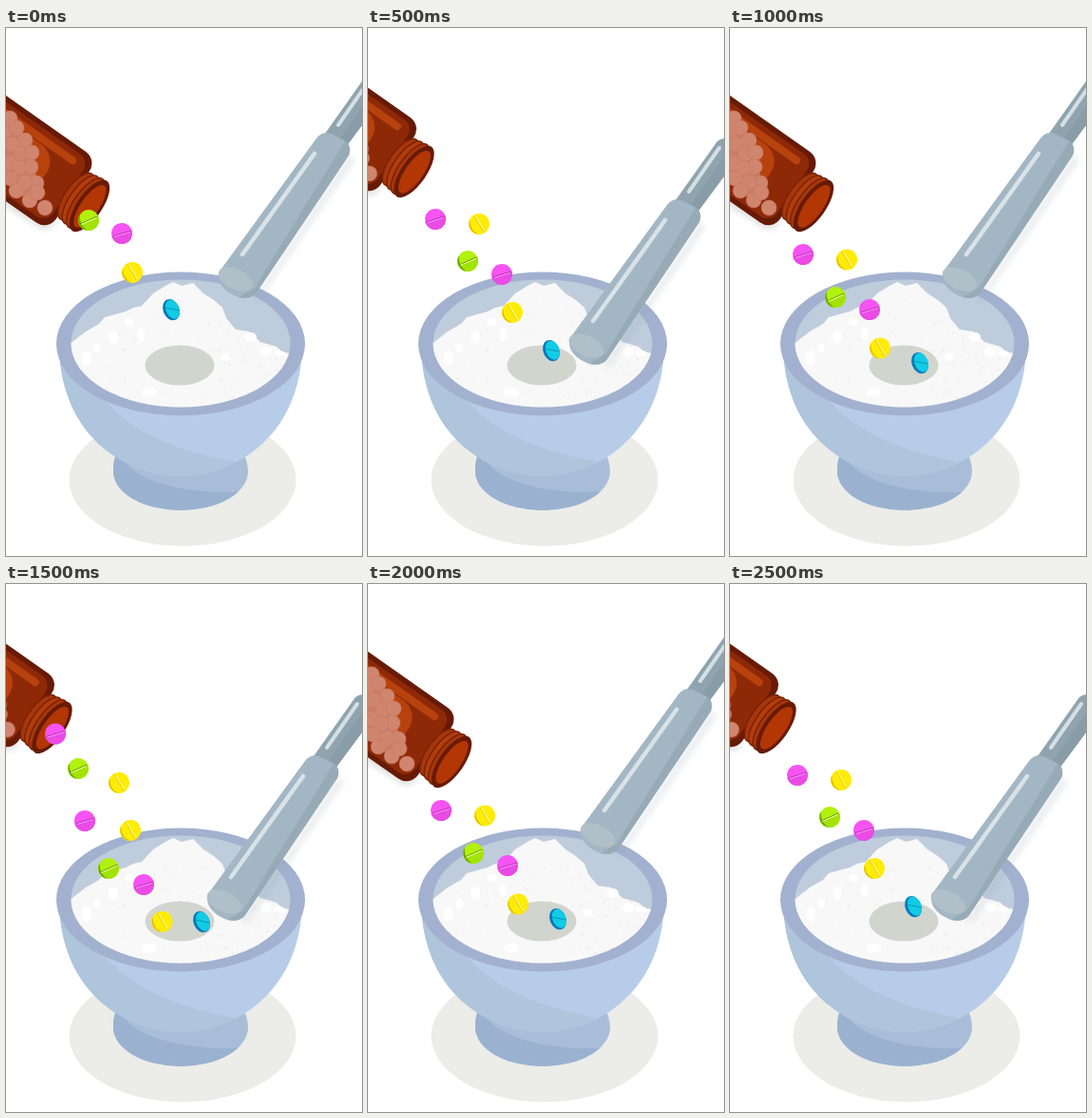
Write an HTML page that moves like this. It is 375 px wide and 555 px high and loops after 3 s.

```html
<!DOCTYPE html>
<html lang="en">
<head>
<meta charset="utf-8">
<title>Mortar and pestle</title>
<style>
  html, body { margin: 0; width: 100%; height: 100%; overflow: hidden; background: #fff; }
  svg { display: block; width: 375px; height: 555px; }
</style>
</head>
<body>
<svg viewBox="0 0 375 555">
  <defs>
    <clipPath id="inside"><ellipse cx="184" cy="331.5" rx="115.5" ry="67"/></clipPath>
    <clipPath id="bowl"><path d="M56 335C58 432 129 471 184 471S310 431 312 335Z"/></clipPath>
    <clipPath id="foot"><path d="M121 440C113 450 113 460 113 466A71 41 0 0 0 255 466Q255 455 247 440Z"/></clipPath>
    <filter id="soft" x="-30%" y="-30%" width="160%" height="160%"><feGaussianBlur stdDeviation="3"/></filter>
    <g id="magenta" transform="rotate(-17)">
      <circle r="11" fill="#f653f3"/>
      <path d="M-11 0A11 11 0 0 0 11 0Z" fill="#e94be4"/>
      <path d="M-10 0H10" stroke="#a92fa8" stroke-width=".8"/>
      <path d="M-9 1H9" stroke="#ff9dfb" stroke-width=".8"/>
    </g>
    <g id="yellow" transform="rotate(60)">
      <circle r="11" fill="#ffec05"/>
      <path d="M-9 6A11 11 0 0 0 9 6Q0 12-9 6Z" fill="#dfbd00"/>
      <path d="M-10 0H10" stroke="#e0c000" stroke-width=".8"/>
      <path d="M-9-1H9" stroke="#fff9a0"/>
    </g>
    <g id="green" transform="rotate(-24)">
      <circle r="11" fill="#b2f00e"/>
      <path d="M-11 0A11 11 0 0 0 11 0Z" fill="#a2e306"/>
      <path d="M-6-9A11 11 0 0 0-6 9Q-11 0-6-9Z" fill="#6fa900"/>
      <path d="M-10 0H10" stroke="#588600" stroke-width=".9"/>
      <path d="M-9 1H9" stroke="#e2ff98"/>
    </g>
    <g id="cyan" transform="rotate(-22)">
      <ellipse cx="-.5" rx="8.5" ry="11.5" fill="#0879b9"/>
      <ellipse cx="1" rx="7" ry="10.5" fill="#12cbe5"/>
      <path d="M-5-4L7 4" stroke="#078fb8" stroke-width=".8"/>
    </g>
  </defs>

  <ellipse cx="186" cy="475" rx="119.5" ry="69.5" fill="#ecece8"/>
  <g clip-path="url(#foot)">
    <path d="M100 430H270V520H100Z" fill="#a9bdd9"/>
    <path d="M100 430H118L122 452C135 475 185 492 256 487V520H100Z" fill="#9ab2d0"/>
  </g>
  <g clip-path="url(#bowl)">
    <path d="M50 330H320V480H50Z" fill="#b7cce8"/>
    <path d="M50 330H80L96 380C118 415 165 442 240 456L230 480H50Z" fill="#aec5dc"/>
  </g>
  <ellipse cx="184" cy="332" rx="131" ry="75.5" fill="#a2b1cf"/>
  <g clip-path="url(#inside)">
    <path d="M60 260H310V400H60Z" fill="#bfccdc"/>
    <path d="M66 333L84 319L98 311L104 304L126 298L134 294L143 292L155 279L168 271L176 267L185 271L197 268L208 279L219 286L228 294L232 305L242 317L256 319L268 330L285 335L292 341L302 342V402H66Z" fill="#f8f8f8"/>
    <g id="specks" fill="#f1f1f2"></g>
    <g id="lumps" fill="#fff"></g>
    <ellipse cx="183" cy="354.5" rx="36.5" ry="21" fill="#d2d4ce"/>
  </g>

  <g id="pestle">
    <path d="M255 282L262 284L362 134L368 138L266 287Z" fill="#8895a0" opacity=".2" filter="url(#soft)"/>
    <path d="M336 111L380 49Q388 43 398 49Q407 56 402 66L358 125Z" fill="#8fa4af"/>
    <path d="M349 120L397 51Q407 56 402 66L358 125Z" fill="#889da8"/>
    <path d="M350 102L382 56" stroke="#d4dfe4" stroke-width="4" stroke-linecap="round"/>
    <path d="M224 257L327 116Q333 108 342 111L356 118Q365 124 361 134L264 278Q258 286 245 283Q222 274 224 257Z" fill="#a3b6c3"/>
    <path d="M262 273L357 119Q365 124 361 134L264 278Q258 286 245 283Z" fill="#97abb7"/>
    <ellipse cx="242" cy="264" rx="19.5" ry="10.5" transform="rotate(26 242 264)" fill="#b0c0c8"/>
    <path d="M249 238L325 132" stroke="#d8e2e7" stroke-width="4.5" stroke-linecap="round"/>
  </g>

  <g id="bottle">
    <path d="M0 176L40 205L56 200L48 210L38 212L-40 163Z" fill="#888" opacity=".25" filter="url(#soft)"/>
    <g transform="translate(88 187) rotate(35)">
      <rect x="-260" y="-44.5" width="239" height="91" rx="15" fill="#671a05"/>
      <rect x="-260" y="-39" width="233" height="80" rx="13" fill="#8e2908"/>
      <rect x="-260" y="-24" width="203" height="48" rx="22" fill="#b7420e"/>
      <rect x="-260" y="-33" width="222" height="8" rx="4" fill="#b7420e"/>
    </g>
    <path d="M-60 60L5 94L25 120L31 150L34 178L22 180L0 163L-60 120Z" fill="#c97d66"/>
    <g id="stock" fill="#d0856f" stroke="#c4775f" stroke-width=".5"></g>
    <g transform="translate(88 187) rotate(35)" stroke="#7a2206" stroke-width="1.5">
      <ellipse cx="-17" rx="12" ry="29" fill="#a6370b"/>
      <ellipse cx="-11" rx="12" ry="30" fill="#b23c0c"/>
      <ellipse cx="-5" rx="12" ry="31" fill="#a6370b"/>
      <ellipse rx="13" ry="32" fill="#671a05" stroke="none"/>
      <ellipse cx=".5" rx="9.5" ry="26.5" fill="#b33605" stroke="none"/>
    </g>
  </g>
  <g id="pills"></g>
</svg>
<script>
const $ = id => document.getElementById(id);
const ellipse = (x, y, rx, ry = rx) => `<ellipse cx="${x}" cy="${y}" rx="${rx}" ry="${ry}"/>`;

let seed = 7;
const random = () => (seed = seed * 16807 % 2147483647) / 2147483647;
$('specks').innerHTML = Array.from({ length: 110 }, () => {
  const x = 85 + random() * 200;
  const top = 283 + Math.abs(x - 184) * 0.53;
  return ellipse(x, top + random() * (392 - top), 0.7 + random() * 1.5, 0.6 + random());
}).join('');

$('lumps').innerHTML = [
  [113, 325, 5, 7], [142, 322, 4, 7], [151, 383, 8, 5], [85, 347, 5, 8], [96, 336, 4, 5],
  [231, 346, 5, 4], [258, 325, 6, 5], [274, 340, 6, 5], [288, 342, 6, 3], [130, 309, 5, 4]
].map(lump => ellipse(...lump)).join('');

$('stock').innerHTML = [
  [4, 95], [0, 108], [11, 105], [20, 118], [6, 122], [16, 132], [27, 131], [4, 142],
  [26, 146], [14, 147], [5, 158], [32, 163], [20, 162], [11, 171], [25, 181], [33, 173], [41, 189]
].map(([x, y]) => ellipse(x, y, 8)).join('');

// One entry per pose: the pills in the air.
const poses = [
  [['green', 87, 202], ['magenta', 122, 216], ['yellow', 133, 257], ['cyan', 174.5, 296]],
  [['magenta', 71, 201], ['yellow', 117, 206], ['green', 105, 245], ['magenta', 141, 259],
   ['yellow', 152, 299], ['cyan', 193.5, 339]],
  [['magenta', 77, 238], ['yellow', 123, 243.5], ['green', 111, 283], ['magenta', 147, 296],
   ['yellow', 158, 336.5], ['cyan', 200.5, 352]],
  [['magenta', 52, 157.5], ['green', 76, 194], ['yellow', 119, 209], ['magenta', 83, 249],
   ['yellow', 131, 259], ['green', 108, 299], ['magenta', 145, 316], ['yellow', 164.5, 355],
   ['cyan', 206.5, 355]]
];
const order = [0, 1, 2, 3, 2, 1];
let shown = -1;

function draw(now) {
  const step = Math.floor(now / 500) % order.length;
  if (step !== shown) {
    shown = step;
    const moved = step % 2;
    $('bottle').setAttribute('transform', `translate(${-39.5 * moved} ${-36 * moved})`);
    $('pestle').setAttribute('transform', `translate(${-12 * moved} ${70 * moved})`);
    $('pills').innerHTML = poses[order[step]]
      .map(([kind, x, y]) => `<use href="#${kind}" x="${x}" y="${y}"/>`).join('');
  }
  requestAnimationFrame(() => draw(performance.now() - start));
}
const start = performance.now();
draw(0);
</script>
</body>
</html>
```
